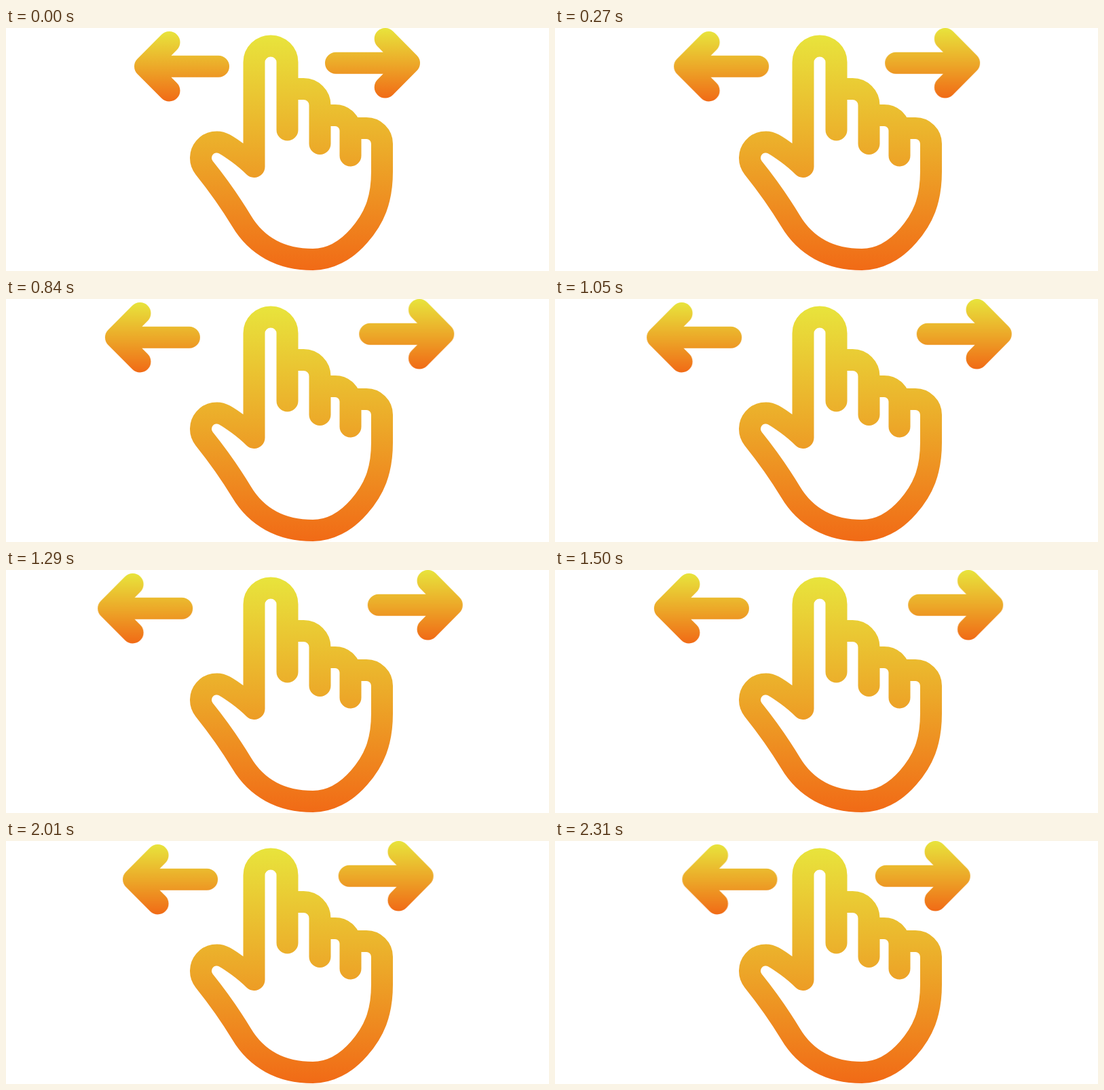
These frames come from a looping animation (800 by 359 pixels, 2340 ms). An HTML page:

```html
<!DOCTYPE html>
<html lang="en">
<head>
<meta charset="utf-8">
<title>Swipe gesture</title>
<style>
  html, body { margin: 0; width: 100%; height: 100%; overflow: hidden; background: #fff; }
  svg { display: block; width: 800px; height: 359px; }
  path { fill: none; stroke-width: 32; stroke-linecap: round; stroke-linejoin: round; }
  .arrow { animation: slide 2340ms steps(39) infinite; }
  .left { --travel: -60px; }
  .right { --travel: 70px; }
  @keyframes slide {
    0%, 100% { transform: translateX(0); }
    50% { transform: translateX(var(--travel)); }
  }
</style>
</head>
<body>
<svg viewBox="0 0 800 359">
  <defs>
    <linearGradient id="warm" gradientUnits="userSpaceOnUse" x1="0" y1="10" x2="0" y2="358">
      <stop offset="0" stop-color="#e8e43c"/>
      <stop offset=".5" stop-color="#eca929"/>
      <stop offset="1" stop-color="#f16a16"/>
    </linearGradient>
    <linearGradient id="warmLeft" href="#warm" y1="5" y2="109"/>
    <linearGradient id="warmRight" href="#warm" y1="0" y2="104"/>
  </defs>

  <!-- thumb, index finger, then the three folded fingers and palm -->
  <path stroke="url(#warm)" d="
    M414.5 150.5 V50.5 A24.5 24 0 0 0 365.5 50.5 V205
    C352 191 330 176 322 171.5
    A23.5 23.5 0 0 0 292 206.5
    C310 229 330 257 347 285
    C369 322 405 342 452 342
    C476 342 500 330 520 307
    C542 282 554 255 554 212
    V171 A23 23 0 0 0 531 148 H515
    M420 90 H438.5 A24 24 0 0 1 462.5 114 V171
    M470 129 H485 A22.5 22.5 0 0 1 507.5 151.5 V188.5"/>

  <path class="arrow left" stroke="url(#warmLeft)" d="M240.5 21 L205 56.8 L240.5 92.5 M205 56.8 H313"/>
  <path class="arrow right" stroke="url(#warmRight)" d="M558.7 16 L594 51.8 L558.7 87.5 M594 51.8 H486"/>
</svg>
</body>
</html>
```
